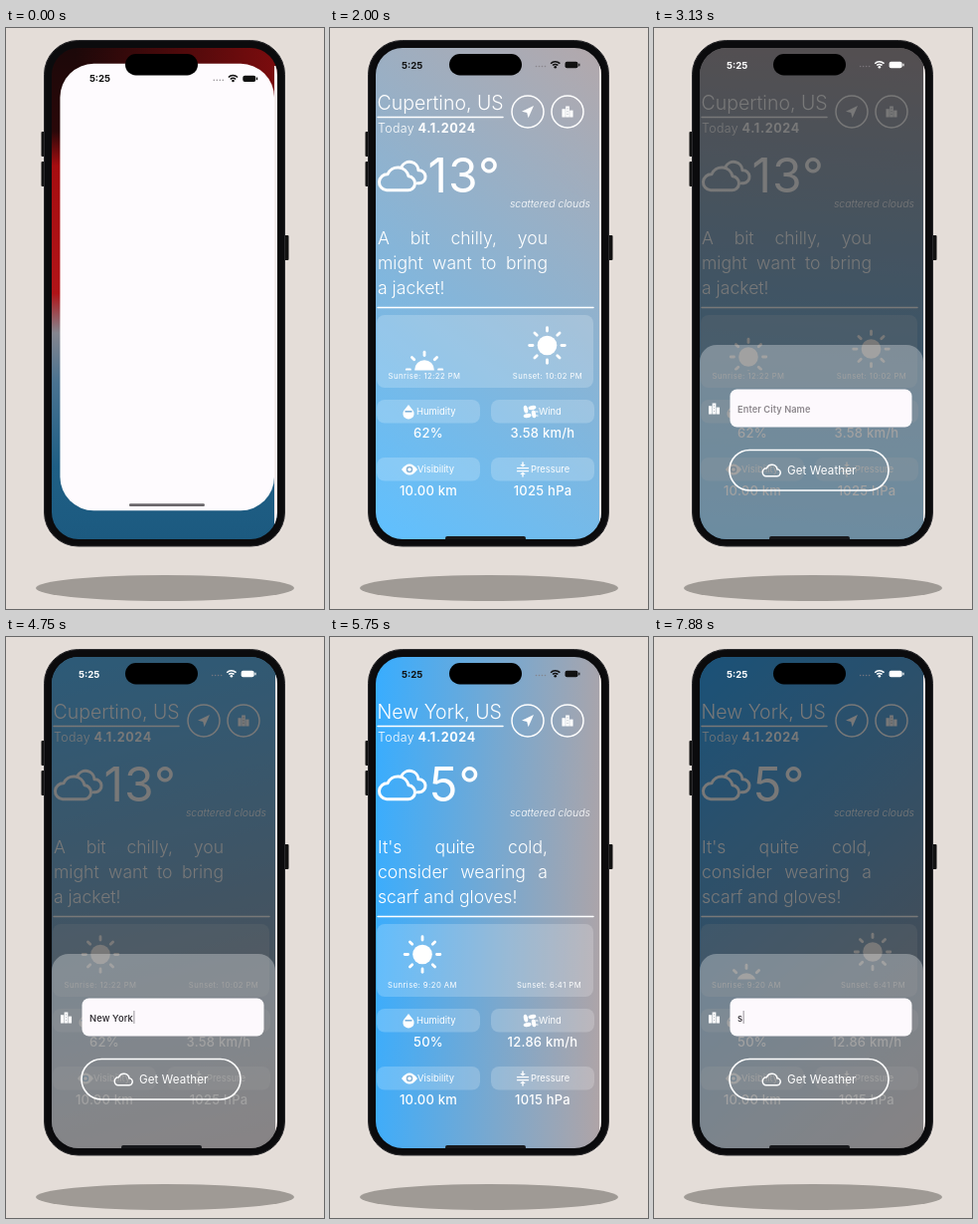
An HTML page with a canvas for the animation above (8 s loop, 320 px wide and 583 px high).

```html
<!DOCTYPE html>
<html lang="en">
<head>
<meta charset="utf-8">
<title>Weather app</title>
<style>
html, body { margin: 0; width: 100%; height: 100%; overflow: hidden; background: #e4ddd8; }
canvas { display: block; width: 320px; height: 583px; }
</style>
</head>
<body>
<canvas id="stage"></canvas>
<script>
const LOOP = 8000, W = 320, H = 583;
const FONT = 'Inter, "Noto Sans", sans-serif';
const canvas = document.getElementById('stage');
const ctx = canvas.getContext('2d');
const ratio = window.devicePixelRatio || 1;
canvas.width = W * ratio;
canvas.height = H * ratio;

const screen = { x: 46, y: 20, w: 227, h: 493 };
const cities = [
  { name: 'Cupertino, US', temp: '13°', tempX: 98.5, advice: ['A bit chilly, you', 'might want to bring', 'a jacket!'],
    colors: ['#5fc0ff', '#b3a8ab'],
    rise: '12:22 PM', riseX: 95, set: '10:02 PM', setX: 219, values: ['62%', '3.58 km/h', '10.00 km', '1025 hPa'] },
  { name: 'New York, US', temp: '5°', tempX: 100, advice: ["It's quite cold,", 'consider wearing a', 'scarf and gloves!'],
    colors: ['#38adff', '#b0a4a6'],
    rise: '9:20 AM', riseX: 93, set: '6:41 PM', setX: 220.5, values: ['50%', '12.86 km/h', '10.00 km', '1015 hPa'] }
];

// Piecewise linear tracks of [time, value]
const gradientAngle = [[0, 200], [2000, 38], [3130, 5], [4750, -195], [5750, -268], [6380, -350], [8000, -600]];
const sunriseY = [[700, 366], [2000, 343], [3130, 330], [3900, 318.5], [6450, 318.5], [6900, 366], [7250, 366], [7880, 347], [8000, 345]];
const sunsetY = [[700, 318.5], [2000, 318.5], [3130, 322], [4300, 366], [5900, 366], [6380, 341], [6900, 316], [8000, 316]];

const cloudPath = new Path2D('M9 25.5H30A7 7 0 0 0 31 11.5A11 11 0 0 0 10 9.5A8 8 0 0 0 9 25.5Z');
const backCloud = new Path2D('M24 2A9 9 0 0 1 41 5.5A6.5 6.5 0 0 1 42 18.5H40');
const dropPath = new Path2D('M0 -7L4.4 -1.5A5.6 5.6 0 1 1 -4.4 -1.5Z');
const eyePath = new Path2D('M-8 0Q0 -11 8 0Q0 11 -8 0Z');

const clamp = v => Math.max(0, Math.min(1, v));
const lerp = (a, b, p) => a + (b - a) * p;
const easeOut = p => 1 - (1 - p) ** 3;
const progress = (t, start, length) => clamp((t - start) / length);

function track(keys, t) {
  if (t <= keys[0][0]) return keys[0][1];
  const i = keys.findIndex(k => k[0] >= t);
  if (i < 0) return keys[keys.length - 1][1];
  const [a, b] = [keys[i - 1], keys[i]];
  return lerp(a[1], b[1], (t - a[0]) / (b[0] - a[0]));
}

function box(x, y, w, h, r, fill) {
  ctx.beginPath();
  ctx.roundRect(x, y, w, h, r);
  if (fill) { ctx.fillStyle = fill; ctx.fill(); }
}

function disc(x, y, r, fill) {
  ctx.beginPath();
  ctx.arc(x, y, r, 0, Math.PI * 2);
  if (fill) { ctx.fillStyle = fill; ctx.fill(); }
}

function line(x1, y1, x2, y2, width = 1.5) {
  ctx.lineWidth = width;
  ctx.beginPath();
  ctx.moveTo(x1, y1);
  ctx.lineTo(x2, y2);
  ctx.stroke();
}

function text(s, x, y, size, { weight = 400, align = 'left', color = '#fff', spacing = 0, style = '' } = {}) {
  ctx.font = `${style} ${weight} ${size}px ${FONT}`;
  ctx.letterSpacing = spacing + 'px';
  ctx.textAlign = align;
  ctx.fillStyle = color;
  ctx.fillText(s, x, y);
  return ctx.measureText(s).width;
}

function justified(s, x, y, size, width) {
  ctx.font = `300 ${size}px ${FONT}`;
  ctx.letterSpacing = '0px';
  const words = s.split(' ');
  const widths = words.map(w => ctx.measureText(w).width);
  const gap = (width - widths.reduce((a, b) => a + b)) / (words.length - 1);
  words.forEach((w, i) => {
    text(w, x, y, size, { weight: 300 });
    x += widths[i] + gap;
  });
}

function at(x, y, scale, draw) {
  ctx.save();
  ctx.translate(x, y);
  ctx.scale(scale, scale);
  draw();
  ctx.restore();
}

function cityIcon(x, y) {
  at(x, y, .92, () => {
    ctx.fillStyle = '#fff';
    ctx.fillRect(-6, -3, 3.6, 9);
    ctx.fillRect(-2, -6, 4, 12);
    ctx.fillRect(2.4, -1.5, 3.6, 7.5);
    ctx.fillStyle = 'rgba(120,130,145,.6)';
    for (let row = 0; row < 3; row++) ctx.fillRect(-.5, -4 + row * 3, 1, 1.4);
  });
}

function sun(x, y) {
  ctx.save();
  ctx.beginPath();
  ctx.rect(x - 25, 290, 50, 53.5);
  ctx.clip();
  disc(x, y, 9.8, '#fff');
  for (let i = 0; i < 8; i++) {
    const c = Math.cos(i * Math.PI / 4), s = Math.sin(i * Math.PI / 4);
    line(x + c * 14.5, y + s * 14.5, x + c * 17.8, y + s * 17.8, 2.8);
  }
  ctx.restore();
}

function fillGradient(t, [from, to]) {
  const a = track(gradientAngle, t) * Math.PI / 180;
  const dx = Math.sin(a), dy = -Math.cos(a), { x, y, w, h } = screen;
  const half = (Math.abs(w * dx) + Math.abs(h * dy)) / 2;
  const cx = x + w / 2, cy = y + h / 2;
  const g = ctx.createLinearGradient(cx - dx * half, cy - dy * half, cx + dx * half, cy + dy * half);
  g.addColorStop(0, from);
  g.addColorStop(1, to);
  ctx.fillStyle = g;
  ctx.fillRect(x, y, w, h);
}

function metricIcons() {
  at(79, 385, 1, () => {
    ctx.fillStyle = '#fff';
    ctx.fill(dropPath);
    ctx.fillStyle = '#7fb2da';
    ctx.fillRect(-3.5, -1, 7, 1.6);
  });
  at(201, 385, 1, () => {
    for (let i = 0; i < 4; i++) {
      ctx.rotate(Math.PI / 2);
      ctx.fillStyle = '#fff';
      ctx.beginPath();
      ctx.ellipse(2.4, -4, 4, 2.1, -.2, 0, Math.PI * 2);
      ctx.fill();
    }
    line(3, 0, 8, 0, 1.2);
    line(4, 4, 8, 4, 1.2);
  });
  at(80, 443, 1, () => {
    ctx.fillStyle = '#fff';
    ctx.fill(eyePath);
    disc(0, 0, 3.3, '#87b3d6');
    disc(0, 0, 1.8, '#fff');
  });
  at(194, 443, 1, () => {
    line(-5.5, -1.3, 5.5, -1.3, 1.3);
    line(-5.5, 1.7, 5.5, 1.7, 1.3);
    for (const s of [-1, 1]) {
      line(0, s * 4, 0, s * 7, 1.4);
      ctx.beginPath();
      ctx.moveTo(-2.8, s * 5);
      ctx.lineTo(2.8, s * 5);
      ctx.lineTo(0, s * 2.6);
      ctx.fillStyle = '#fff';
      ctx.fill();
    }
  });
}

function home(t) {
  const city = cities[t < 5300 ? 0 : 1];
  fillGradient(t, city.colors);
  ctx.strokeStyle = '#fff';
  ctx.lineCap = ctx.lineJoin = 'round';

  text(city.name, 47.5, 82, 19.5, { weight: 300 });
  line(48, 89.5, 174, 89.5);
  text('Today', 48, 105, 12.4, { weight: 300, spacing: .35 });
  text('4.1.2024', 88.5, 105, 12.6, { weight: 700, spacing: .6 });

  ctx.lineWidth = 1.5;
  for (const x of [199, 239]) { disc(x, 84, 16); ctx.stroke(); }
  ctx.fillStyle = '#fff';
  ctx.fill(new Path2D('M205 78L193 83.7L198.2 85L199.6 90.2Z'));
  cityIcon(239, 84);

  at(48, 137.3, 1, () => {
    ctx.lineWidth = 3;
    ctx.stroke(cloudPath);
    ctx.stroke(backCloud);
  });
  text(city.temp, city.tempX, 164.5, 48, { weight: 400, spacing: 1 });
  text('scattered clouds', 262, 180, 10.5, { weight: 300, align: 'right', style: 'italic' });

  city.advice.forEach((s, i) => {
    const y = 217 + i * 25;
    if (i < 2) justified(s, 48, y, 17.6, 171);
    else text(s, 48, y, 17.6, { weight: 300 });
  });
  line(48, 280.5, 265, 280.5);

  const glass = 'rgba(255,255,255,.2)';
  box(47, 288, 218, 73, 8, glass);
  sun(city.riseX, track(sunriseY, t));
  sun(city.setX - .5, track(sunsetY, t));
  const small = { align: 'center', spacing: .45 };
  text('Sunrise: ' + city.rise, city.riseX, 352, 7.7, small);
  text('Sunset: ' + city.set, city.setX, 352, 7.7, small);

  const labels = [['Humidity', 87], ['Wind', 210], ['Visibility', 88], ['Pressure', 202]];
  labels.forEach(([label, x], i) => {
    const left = i % 2 ? 162 : 47, top = i < 2 ? 373 : 431;
    box(left, top, 104, 23.5, 8, glass);
    text(label, x, top + 15.3, 9.4);
    text(city.values[i], left + 52, top + 38, 13, { weight: 500, align: 'center', spacing: .25 });
  });
  metricIcons();
}

function typed(t) {
  if (t < 5300) return 'New York'.slice(0, Math.max(0, Math.floor((t - 3500) / 120)));
  return t > 7780 ? 's' : '';
}

function sheetOpen(t) {
  if (t < 5300) return easeOut(progress(t, 2450, 370)) * (1 - progress(t, 4950, 230) ** 2);
  return easeOut(progress(t, 6142, 370));
}

function sheet(t, open) {
  if (!open) return;
  ctx.fillStyle = `rgba(0,0,0,${.53 * Math.min(1, open * 1.04)})`;
  ctx.fillRect(screen.x, screen.y, screen.w, screen.h);
  at(0, (1 - open) * 195, 1, () => {
    box(46, 318, 225, 200, [17, 17, 0, 0], 'rgba(255,255,255,.3)');
    cityIcon(60.5, 382);
    box(76.5, 362.5, 183, 38, 7, '#fdf9fd');
    const entry = typed(t);
    if (entry) {
      const width = text(entry, 84, 385.5, 9.4, { weight: 500, color: '#28252a', spacing: .1 });
      ctx.fillStyle = '#9a969c';
      ctx.fillRect(84 + width + .5, 375, 1, 13);
    } else {
      text('Enter City Name', 84, 385.5, 9.2, { weight: 600, color: '#8c878c', spacing: .1 });
    }
    ctx.strokeStyle = '#fff';
    ctx.lineWidth = 1.6;
    box(76, 423.5, 160, 40.5, 20.2);
    ctx.stroke();
    at(108.5, 437, .5, () => { ctx.lineWidth = 3; ctx.stroke(cloudPath); });
    text('Get Weather', 134, 448, 11.6, { spacing: .1 });
  });
}

function statusBar(dx, dy, color) {
  text('5:25', 72 + dx, 40.5 + dy, 9.6, { weight: 700, color });
  at(dx * .15, dy, 1, () => {
    for (let i = 0; i < 4; i++) disc(207.5 + i * 3, 38.5, .8, 'rgba(130,125,130,.8)');
    ctx.strokeStyle = color;
    ctx.lineCap = 'butt';
    for (const r of [3.6, 6.3]) {
      ctx.lineWidth = 1.5;
      ctx.beginPath();
      ctx.arc(226.7, 40, r, -Math.PI * .76, -Math.PI * .24);
      ctx.stroke();
    }
    disc(226.7, 39.2, 1.3, color);
    box(236.5, 33.8, 13, 6.4, 2, color);
    ctx.fillRect(250.2, 35.7, 1.2, 2.6);
  });
}

function wallpaper() {
  const { x, y, w, h } = screen;
  const v = ctx.createLinearGradient(0, y, 0, y + h);
  [[0, '#1c0809'], [.17, '#2a0809'], [.24, '#a50d10'], [.5, '#b01418'], [.58, '#85868f'], [.68, '#4a7391'], [.85, '#1f5f85'], [1, '#1c5a80']]
    .forEach(([p, c]) => v.addColorStop(p, c));
  ctx.fillStyle = v;
  ctx.fillRect(x, y, w, h);
  const g = ctx.createLinearGradient(70, 0, 265, 0);
  g.addColorStop(0, 'rgba(130,12,14,0)');
  g.addColorStop(1, 'rgba(130,12,14,.9)');
  ctx.fillStyle = g;
  ctx.fillRect(x, y, w, 80);
}

function launch(t) {
  const p = easeOut(progress(t, 0, 300));
  wallpaper();
  ctx.fillStyle = '#f6eeee';
  ctx.fillRect(270, 38, 3, 475);
  box(lerp(54.5, 46, p), lerp(36, 20, p), lerp(215.5, 227, p), lerp(448, 493, p), lerp(34, 27, p), '#fefbfe');
  box(lerp(124, 116, p), lerp(477, 510, p), lerp(76, 81, p), 2.6, 1.3, '#6a676b');
  statusBar(lerp(12, 0, p), lerp(14, 0, p), '#111');
}

function phone() {
  ctx.fillStyle = '#9f9a95';
  ctx.beginPath();
  ctx.ellipse(160, 562, 130, 13, 0, 0, Math.PI * 2);
  ctx.fill();
  box(35.5, 104, 4, 25, 1, '#111');
  box(35.5, 134, 4, 25, 1, '#111');
  box(280, 208, 4.5, 25, 1, '#111');
  box(38.5, 12.5, 242, 507.5, 34, '#0b0b0d');
  ctx.strokeStyle = '#29292c';
  ctx.lineWidth = 1;
  ctx.stroke();
}

function render(t) {
  ctx.setTransform(ratio, 0, 0, ratio, 0, 0);
  ctx.fillStyle = '#e4ddd8';
  ctx.fillRect(0, 0, W, H);
  phone();
  ctx.save();
  box(screen.x, screen.y, screen.w, screen.h, 27);
  ctx.clip();
  if (t < 750) launch(t);
  else {
    const open = sheetOpen(t);
    home(t);
    sheet(t, open);
    statusBar(open > .5 ? 1 : 0, 0, open > .98 ? '#fff' : '#111');
    box(116, 510, 81, 4, 2, '#18191c');
    ctx.fillStyle = '#efe8e6';
    ctx.fillRect(271, 38, 2, 470);
  }
  ctx.restore();
  box(120, 26, 73, 21.5, 10.7, '#000');
}

function tick(now) {
  render(now % LOOP);
  requestAnimationFrame(tick);
}
render(0);
requestAnimationFrame(tick);
</script>
</body>
</html>
```
